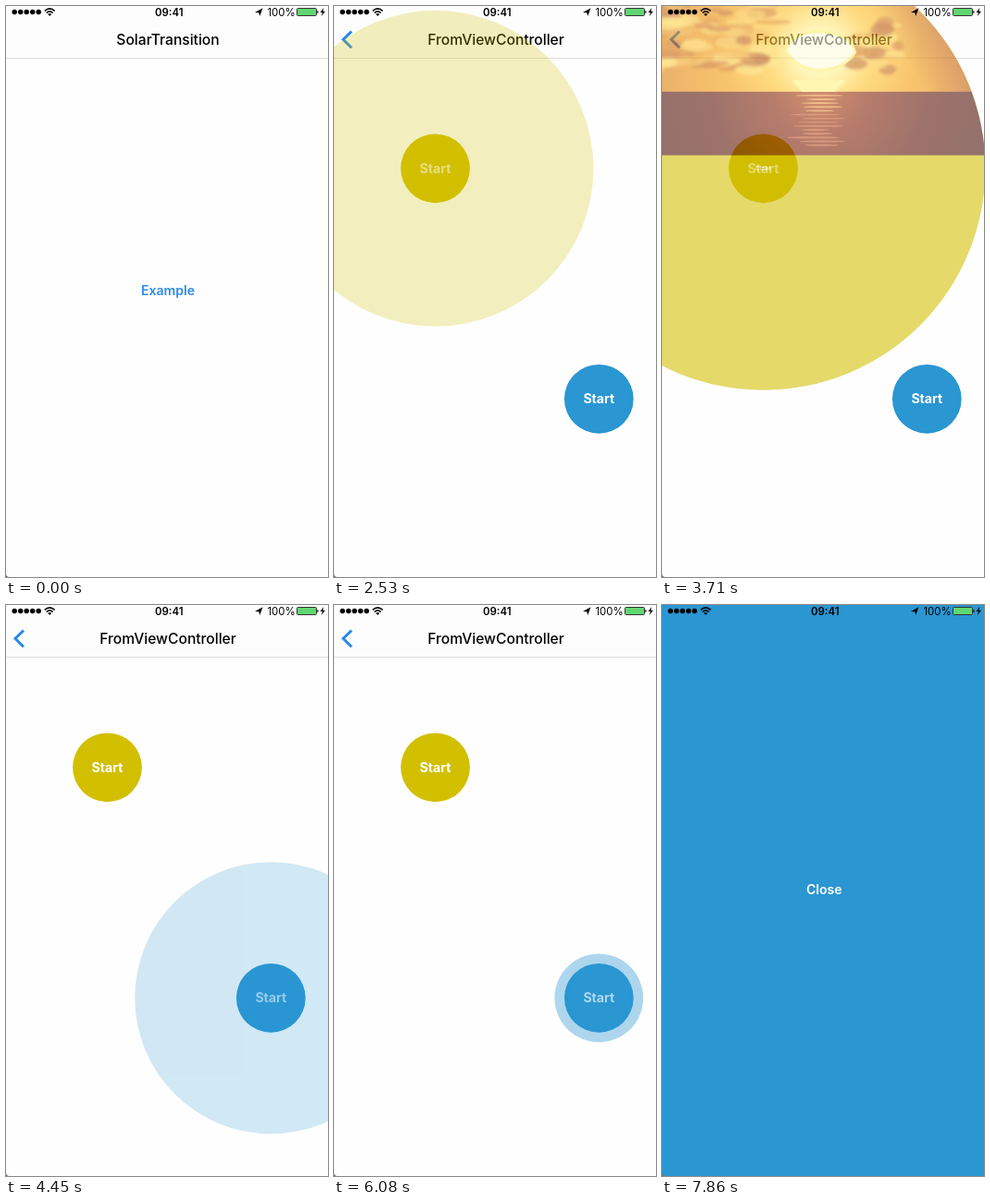
Write an HTML page that moves like this. It is 348 by 618 pixels and loops after 8000 ms.

```html
<!DOCTYPE html>
<html lang="en">
<head>
<meta charset="utf-8">
<title>SolarTransition</title>
<style>
  html, body { margin: 0; width: 100%; height: 100%; overflow: hidden; background: #fefefe; }
  svg { display: block; width: 348px; height: 618px; }
  text { font-family: Inter, Roboto, sans-serif; text-anchor: middle; }
  .title { font-size: 15.6px; font-weight: 500; }
  .label { font-size: 14.1px; font-weight: 600; fill: #fff; }
  #from .label { font-weight: 700; }
  .status { font-size: 11.4px; }
</style>
</head>
<body>
<svg viewBox="0 0 348 618">
  <defs>
    <clipPath id="clip"><circle id="clipDisc"/></clipPath>
    <clipPath id="frame"><path d="M0 0H348V189H0z"/></clipPath>
    <filter id="soft"><feGaussianBlur stdDeviation="1.3"/></filter>
    <radialGradient id="sky" gradientUnits="userSpaceOnUse" cx="218" cy="108" r="190">
      <stop offset=".1" stop-color="#fff08a"/><stop offset=".22" stop-color="#ffc228"/>
      <stop offset=".4" stop-color="#f39a06"/><stop offset=".65" stop-color="#dd7c00"/>
      <stop offset="1" stop-color="#be5c00"/>
    </radialGradient>
    <linearGradient id="dusk" y1=".25" y2="0">
      <stop offset=".64" stop-color="#8a1800" stop-opacity="0"/>
      <stop offset=".82" stop-color="#8a1800" stop-opacity=".6"/>
      <stop offset="1" stop-color="#7c1000" stop-opacity=".95"/>
    </linearGradient>
    <radialGradient id="sea" gradientUnits="userSpaceOnUse" cx="218" cy="136" r="190">
      <stop offset="0" stop-color="#b84208"/><stop offset=".2" stop-color="#842003"/>
      <stop offset=".45" stop-color="#5a1002"/><stop offset="1" stop-color="#320702"/>
    </radialGradient>
  </defs>

  <path d="M0 0H348V618H0z" fill="#fefefe"/>
  <g id="home"><text id="example" class="label" x="175" y="313" style="fill:#2c8bec">Example</text></g>
  <g id="from">
    <circle cx="109.5" cy="175.8" r="37.4" fill="#d2bf00"/>
    <text id="label0" class="label" x="109.5" y="181">Start</text>
    <circle cx="286.3" cy="425.3" r="37.4" fill="#2a96d2"/>
    <text id="label1" class="label" x="286.3" y="430.3">Start</text>
  </g>
  <path d="M0 0H348V56H0z" fill="#fdfdfd"/>
  <path d="M0 56.5H348" stroke="#dedede"/>
  <text id="homeTitle" class="title" x="175" y="42">SolarTransition</text>
  <text id="fromTitle" class="title" x="175" y="42">FromViewController</text>
  <path id="back" d="M19 27.5L10 36.3L19 45.2" fill="none" stroke="#2688ea" stroke-width="3"/>

  <g id="overlay">
    <circle id="disc"/>
    <g id="content">
      <g clip-path="url(#clip)"><g id="photo"><g clip-path="url(#frame)">
        <path d="M0 0H348V141H0z" fill="url(#sky)"/>
        <path d="M0 0H348V141H0z" fill="url(#dusk)"/>
        <g id="clouds" filter="url(#soft)"></g>
        <path d="M192 107Q196 92 218 92Q242 93 246 108Q238 121 218 122Q200 121 192 107z" fill="#fffde0" stroke="#fff06a" stroke-width="2"/>
        <path d="M0 139H348V189H0z" fill="url(#sea)"/>
        <path d="M196 130H239L230 139H204z" fill="#fff07a"/>
        <g id="glints"></g>
      </g></g></g>
      <text id="close" class="label" y="5">Close</text>
    </g>
  </g>

  <g id="bar">
    <path d="M9.2 6.5h0m6.5 0h0m6.5 0h0m6.5 0h0m6.5 0h0" stroke="#000" stroke-width="5.5" stroke-linecap="round"/>
    <g fill="none" stroke="#000" stroke-width="1.6">
      <path d="M41.8 5.3Q47.2 .4 52.6 5.3M43.8 7.5Q47.2 4.4 50.6 7.5"/>
    </g>
    <path d="M45.2 8.8Q47.2 7 49.2 8.8L47.2 11z"/>
    <text class="status" x="176.3" y="10.7" font-weight="600">09:41</text>
    <path d="M269 7L277.5 2.2L274.2 11L273.3 7.2z"/>
    <text class="status" x="297.5" y="10.7">100%</text>
    <rect x="314.5" y="2.5" width="21" height="8" rx="1" fill="#62d672" stroke="#333"/>
    <path d="M336.4 5h1v3h-1zM343.3 2L339.6 7H342L340.8 11L345 5.7H342.4z"/>
  </g>
  <path d="M0 615Q.4 617.6 3 618H0z" fill="#777"/>
</svg>

<script>
const $ = id => document.getElementById(id);
const set = (id, attrs) => {
  for (const k in attrs) $(id).setAttribute(k, attrs[k]);
};
const clamp = v => Math.max(0, Math.min(1, v));

const LOOP = 8000, OPEN = 560, CLOSE = 652, RADIUS = 37.4;
const yellow = { fill: '#d2bf00', cx: 109.5, cy: 175.8 };
const blue = { fill: '#2a96d2', cx: 286.3, cy: 425.3 };
const visits = [
  { spot: yellow, open: 2220, close: 3402 },
  { spot: blue, open: 4165, close: 5650 },
  { spot: blue, open: 6245, close: Infinity }
];

// Clouds and water glints from a seeded generator
let seed = 7;
const rnd = () => (seed = seed * 16807 % 2147483647) / 2147483647;
const add = (parent, cx, cy, rx, ry, fill, opacity) => {
  const e = document.createElementNS('http://www.w3.org/2000/svg', 'ellipse');
  const attrs = { cx, cy, rx, ry, fill, opacity };
  for (const k in attrs) e.setAttribute(k, attrs[k]);
  $(parent).append(e);
};
const tones = ['#ffc534', '#c65c00', '#f2a31c', '#d87400', '#ffd84c', '#b04a00'];
const puffs = (n, x, y, w, h, rx, ry) => {
  for (let i = 0; i < n; i++)
    add('clouds', x + rnd() * w, y + rnd() * h, rx * (.4 + rnd()), ry * (.4 + rnd()), tones[i % 6], .7);
};
puffs(16, 0, 4, 110, 36, 36, 2.6);
puffs(75, 0, 54, 110, 68, 14, 4);
puffs(50, 90, 68, 95, 56, 10, 4);
puffs(24, 246, 84, 34, 40, 7, 4);
add('clouds', 328, 97, 9, 3, '#e88a10', .8);
for (let i = 0; i < 14; i++)
  add('glints', 217 + rnd() * 8 - 4, 142 + i * 3, 10 + rnd() * 12, .5 + rnd() * .5, i < 5 ? '#f0a040' : '#c85a28', .8);

function push(t) {
  const e = 1 - (1 - clamp((t - 1270) / 600)) ** 3;
  set('home', { transform: `translate(${-104 * e})`, opacity: e < 1 ? 1 : 0 });
  set('example', { opacity: t > 1150 ? .4 : 1 });
  set('from', { transform: `translate(${348 * (1 - e)})` });
  set('homeTitle', { x: 175 - 130 * e, opacity: clamp(1 - 1.4 * e) });
  set('fromTitle', { x: 175 + 150 * (1 - e), opacity: e });
  set('back', { opacity: e });
}

function expand(t) {
  const visit = visits.filter(v => t >= v.open).pop();
  set('overlay', { opacity: 0 });
  for (const i of [0, 1]) set('label' + i, { opacity: 1 });
  if (!visit) return;

  const { fill, cx, cy } = visit.spot;
  const age = t - visit.open, out = t - visit.close;
  const isYellow = visit.spot === yellow;
  let f, alpha, shown, r;
  let photo = '', close = 'translate(175.3 308)';

  if (out < 0) {
    f = alpha = clamp(age / OPEN) ** 2.35;
    r = RADIUS + 532 * f;
    shown = clamp((age - OPEN) / 330) ** 1.6;
    set(isYellow ? 'label0' : 'label1', { opacity: .65 });
  } else {
    f = 1 - clamp(out / 437) ** 1.65;
    alpha = clamp((CLOSE - out) / 585);
    r = RADIUS + 465 * f;
    shown = 1;
    const scale = r / 174;
    photo = `translate(${cx - r} ${cy - r * .059 - 189 * scale}) scale(${scale})`;
    close = `translate(${cx} ${cy}) scale(${f})`;
  }
  set('overlay', { opacity: alpha });
  set('disc', { cx, cy, r, fill });
  set('clipDisc', { cx, cy, r });
  set('content', { opacity: shown });
  set('photo', { transform: photo, display: isYellow ? 'inline' : 'none' });
  set('close', { transform: close });
}

const start = performance.now();
function draw() {
  const t = (performance.now() - start) % LOOP;
  push(t);
  expand(t);
  requestAnimationFrame(draw);
}
draw();
</script>
</body>
</html>
```
